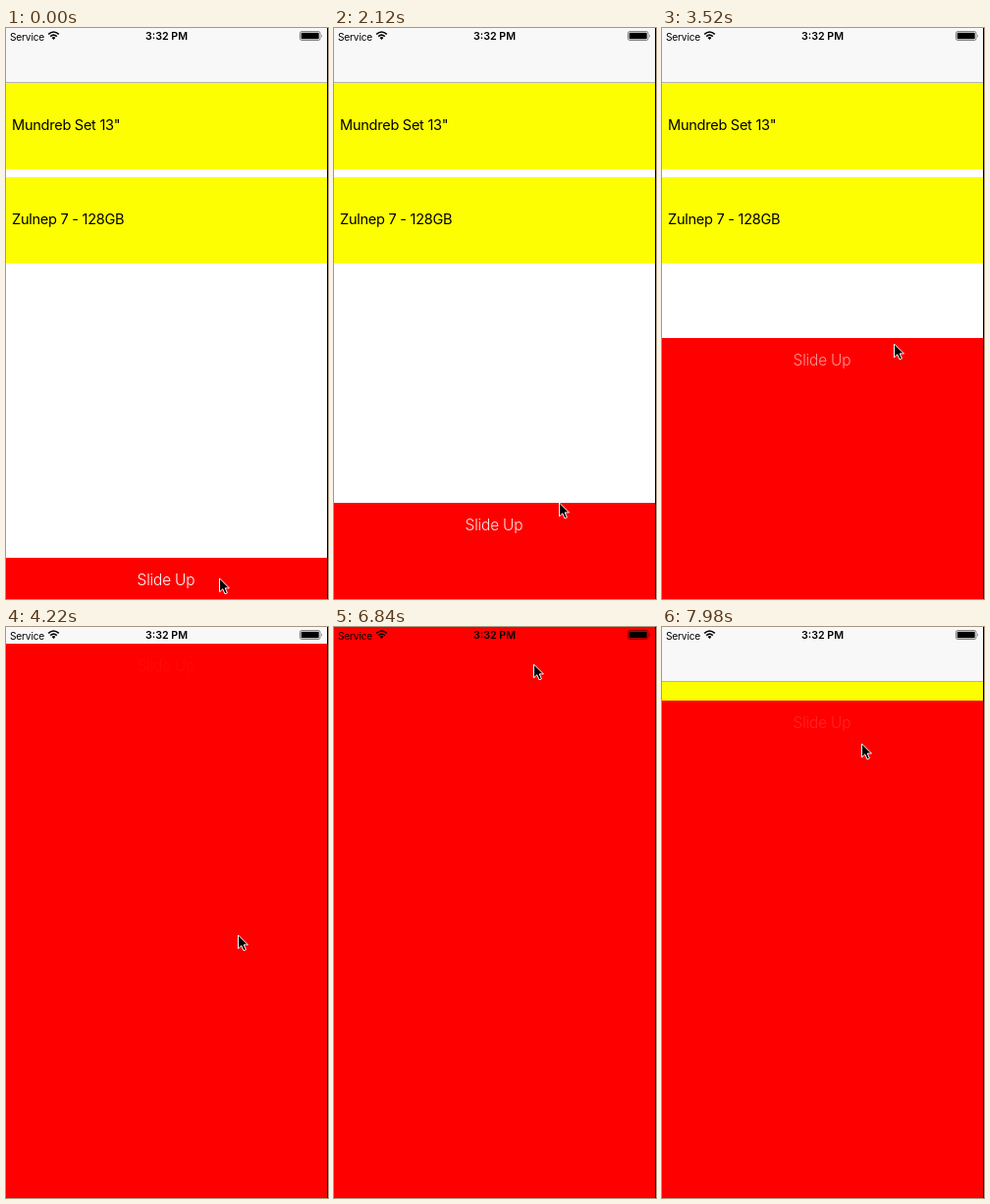
Recreate the animation shown at these times as an HTML page. Size 328 by 582 pixels, loop 8000 ms.

```html
<!DOCTYPE html>
<html lang="en">
<head>
<meta charset="utf-8">
<title>Slide-up panel</title>
<style>
  html, body { margin: 0; width: 100%; height: 100%; overflow: hidden; background: #fff; }
  #stage { position: relative; width: 328px; height: 582px; overflow: hidden; font-family: Inter, Roboto, sans-serif; color: #000; }
  #stage > * { position: absolute; }
  .nav { left: 0; top: 0; width: 328px; height: 55px; background: #f8f8f8; border-bottom: 1px solid #b4b4b4; box-sizing: content-box; }
  .row { left: 0; width: 328px; height: 88px; line-height: 87px; background: #fdfe02; text-indent: 6px; font-size: 14.6px; letter-spacing: -.02em; }
  #panel { left: 0; top: 0; width: 328px; height: 600px; background: #f00; }
  #label { position: absolute; top: 13px; width: 326px; line-height: 20px; text-align: center; color: #fff; font-size: 15.4px; font-weight: 300; letter-spacing: -.01em; }
  .status { line-height: 14px; top: 1.5px; white-space: nowrap; }
  .network { left: 4px; font-size: 10.2px; letter-spacing: -.02em; }
  .clock { left: 0; width: 327px; text-align: center; font-size: 10.7px; font-weight: 600; }
  .edge { right: 0; top: 0; width: 1px; height: 582px; background: #000; }
  svg { left: 0; top: 0; overflow: visible; }
</style>
</head>
<body>
<div id="stage">
  <div class="nav"></div>
  <div class="row" style="top:56px">Mundreb Set 13"</div>
  <div class="row" style="top:152px">Zulnep 7 - 128GB</div>
  <div id="panel"><div id="label">Slide Up</div></div>
  <div class="status network">Service</div>
  <div class="status clock">3:32 PM</div>
  <svg width="328" height="18">
    <g fill="none" stroke="#000" stroke-width="1.6">
      <path d="M43.2 6.4Q48.5 1.6 53.8 6.4"/>
      <path d="M45.2 8.6Q48.5 5.6 51.8 8.6"/>
    </g>
    <path d="M46.6 9.9Q48.5 8.3 50.4 9.9L48.5 11.9Z"/>
    <rect x="299.5" y="3.5" width="20.5" height="9" rx="1.8" fill="none" stroke="#000" stroke-opacity=".6" stroke-width=".8"/>
    <rect x="300.7" y="4.8" width="18" height="6.4" rx=".6"/>
    <path d="M321 6.3q1.6 1.7 0 3.4z" fill-opacity=".6"/>
  </svg>
  <div class="edge"></div>
  <svg id="cursor" width="12" height="18">
    <path d="M.5 0V13.8L3.8 10.8L6 15.8L8.4 14.8L6.2 9.9H10.4Z" stroke="#fff" stroke-linejoin="round"/>
  </svg>
</div>
<script>
const DURATION = 8000;
const REST_TOP = 540;
const STATUS_HEIGHT = 17;
const GRAB_OFFSET = 44;

const linear = u => u;
const smooth = u => u * u * (3 - 2 * u);
const easeOut = u => 1 - (1 - u) ** 2;
const power = p => u => u ** p;

// Eased progress from 0 to 1 between two times.
const ramp = (time, from, to, ease = linear) =>
  ease(Math.min(1, Math.max(0, (time - from) / (to - from))));

const dragUp = t => REST_TOP - 224 * ramp(t, 1300, 3520, power(1.4));

function cursorX(t) {
  return 217 + 12 * ramp(t, 0, 2120) + 7 * ramp(t, 2120, 3520)
    - 41 * ramp(t, 4660, 5460, smooth) + 8 * ramp(t, 5460, 5760);
}

function cursorY(t) {
  const lead = 21 - 21 * ramp(t, 0, 2120) + 6 * ramp(t, 2120, 3520);
  return dragUp(t) + lead
    - 8 * ramp(t, 3520, 4220)
    - 263 * ramp(t, 4660, 5460, smooth)
    - 15 * ramp(t, 5860, 6140)
    + 83 * ramp(t, 6800, 7980, power(1.15));
}

function panelTop(t) {
  if (t > 6140) return Math.max(0, cursorY(t) - GRAB_OFFSET);
  const top = dragUp(t);
  return top + (STATUS_HEIGHT - top) * ramp(t, 3840, 4160, easeOut)
    - STATUS_HEIGHT * ramp(t, 4330, 4420);
}

const [panel, label, cursor] = ['panel', 'label', 'cursor'].map(id => document.getElementById(id));

function place(el, x, y) {
  el.style.transform = `translate(${Math.round(x)}px, ${Math.round(y)}px)`;
}

function draw(t) {
  const top = panelTop(t);
  place(panel, 0, top);
  label.style.opacity = top / REST_TOP;
  place(cursor, cursorX(t), cursorY(t));
}

const start = performance.now();
function tick() {
  draw((performance.now() - start) % DURATION);
  requestAnimationFrame(tick);
}
tick();
</script>
</body>
</html>
```
